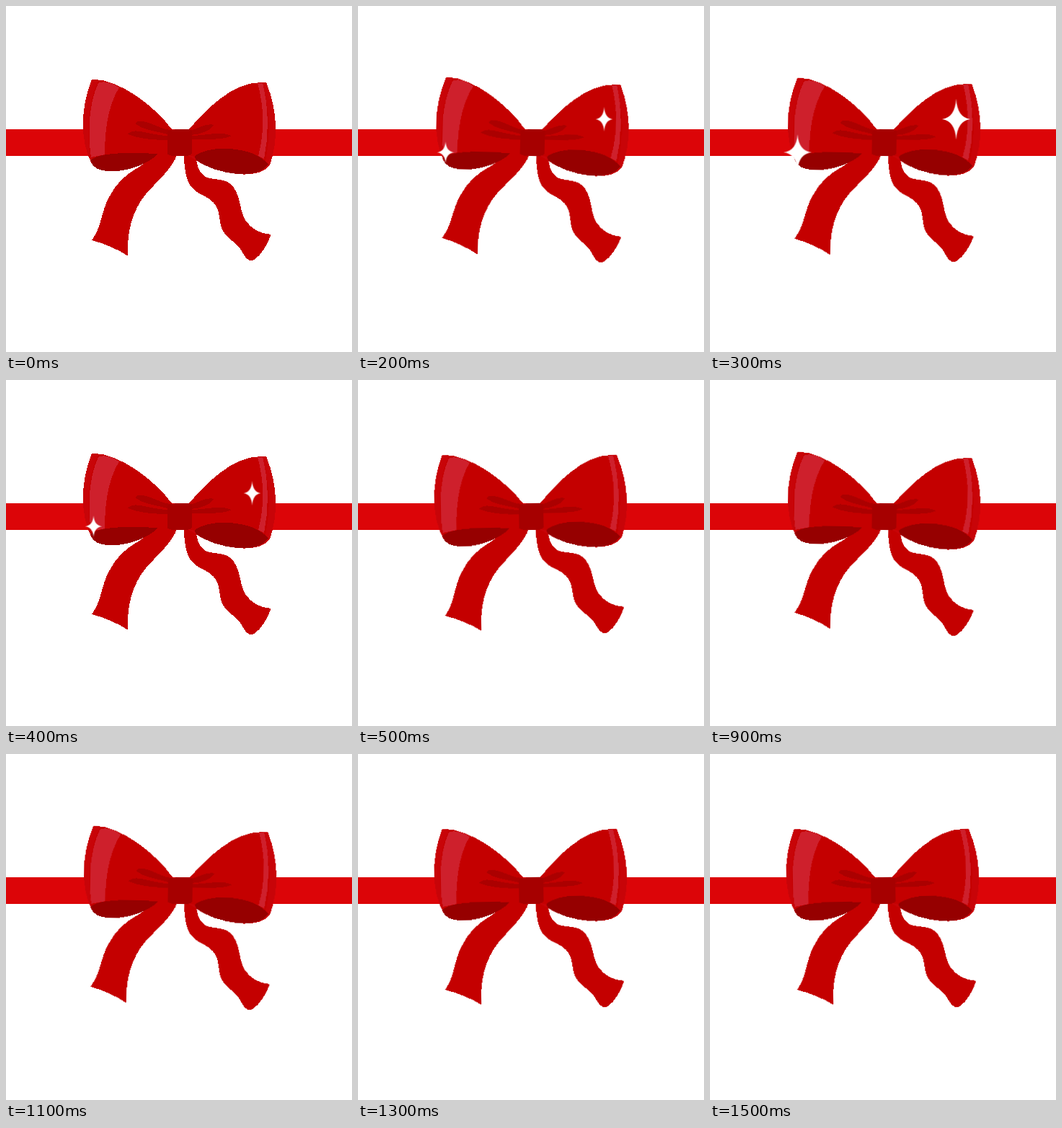
Animation, 480 px wide and 480 px high, one loop 1600 ms. Source, as an HTML page:

```html
<!DOCTYPE html>
<html lang="en">
<head>
<meta charset="utf-8">
<title>Ribbon bow</title>
<style>
  html, body { margin: 0; width: 100%; height: 100%; overflow: hidden; background: #fff; }
  svg { display: block; width: 100vw; height: 100vh; shape-rendering: crispEdges; }

  .band { fill: #dc0508; }
  .silk { fill: #c40000; }
  .rim { fill: #c80408; }
  .shine { fill: #ce202c; }
  .inside { fill: #960000; }
  .fold { fill: #ab0000; }
  .knot { fill: #a60000; }
  .star { fill: #fff; shape-rendering: auto; }

  .bow { transform-origin: 240px 228px; animation: sway 800ms step-end infinite; }
  .star use { transform: scale(0); animation: twinkle 1600ms step-end infinite; }

  /* a sine swing of 1.5deg, held for 100ms per pose */
  @keyframes sway {
    0%, 50%, 100% { transform: rotate(0deg); }
    12.5%, 37.5% { transform: rotate(1.06deg); }
    25% { transform: rotate(1.5deg); }
    62.5%, 87.5% { transform: rotate(-1.06deg); }
    75% { transform: rotate(-1.5deg); }
  }
  @keyframes twinkle {
    0%, 31.25%, 100% { transform: scale(0); }
    12.5%, 25% { transform: scale(.6); }
    18.75% { transform: scale(1); }
  }
</style>
</head>
<body>
<svg viewBox="0 0 480 480">
  <defs>
    <path id="spark" d="M0-28.500Q1.500-2.500 19.500 0Q1.500 2.500 0 28.500Q-1.500 2.500-19.500 0Q-1.500-2.500 0-28.500Z"/>
  </defs>

  <rect class="band" y="171" width="480" height="37"/>

  <g class="bow">
    <!-- tails -->
    <path class="silk" d="M119 325C133 306 132 285 143 265C153 245 167 233 185 223L212 203H239C228 230 210 242 194 261C175 284 167 315 169.500 347C154 337 138 330 119 325Z"/>
    <path class="silk" d="M247 205C247 222 249 243 259 253C270 264 283 264 291 277C299 290 294 304 303 315C312 326 324 332 330 345C334 352 339 355 344 352C354 346 363 331 367.500 317C352 316 340 309 332 297C324 284 326 266 316 252C305 237 291 243 277 237C267 232 264 219 263 205Z"/>

    <!-- left loop -->
    <path class="rim" d="M119 102C152 99 205 137 230 171L232 206H208C184 228 130 239 118 217C103 188 103 140 119 102Z"/>
    <path class="silk" d="M128 104C160 104 206 139 230 171L232 206L118 212C112 178 113 135 128 104Z"/>
    <path class="shine" d="M128 107C136 103 148 107 157 113C141 139 137 174 137 206L118 210C113 175 115 134 128 107Z"/>
    <path class="inside" d="M117 214C130 203 168 203 211 205C197 219 171 229 149 229C130 230 120 225 117 214Z"/>

    <!-- right loop -->
    <path class="rim" d="M254 171C279 142 317 104 361 106C377 145 378 186 366 221C348 244 290 232 262 213L250 206Z"/>
    <path class="silk" d="M254 171C279 142 314 106 354 106C367 142 367 180 360 215L262 209L250 206Z"/>
    <path class="shine" d="M349 107L356 106.500C365 141 365 178 358 212L350 208C359 175 358 139 349 107Z"/>
    <path class="inside" d="M262 208C270 201 289 197 308 198C333 199 354 207 364 220C356 231 340 234 322 233C298 231 277 224 263 213Z"/>

    <!-- creases and knot -->
    <g transform="translate(-1 -1)">
      <path class="fold" d="M181 165C181 160 187 160 195 162C207 165 217 172 229 173V180C211 175 191 173 181 165Z"/>
      <path class="fold" d="M170 179C174 173 184 174 192 176C204 178 214 181 227 181V187C206 187 183 185 170 179Z"/>
      <path class="fold" d="M289 166C279 163 267 171 257 174V180C272 179 285 174 289 166Z"/>
      <path class="fold" d="M314 181C299 174 278 181 257 181V186C276 185 300 188 314 181Z"/>
    </g>
    <path class="knot" d="M228 172C236 171 246 171 254 171.500Q259 172 258.500 178Q257 189 258.500 200Q259 207 253 207.500H230Q223 208 223.500 201Q225 189 223.500 179Q223 173 228 172Z"/>
  </g>

  <g class="star" transform="translate(121.500 203) scale(1 .88)"><use href="#spark"/></g>
  <g class="star" transform="translate(341.500 157)"><use href="#spark"/></g>
</svg>
</body>
</html>
```
